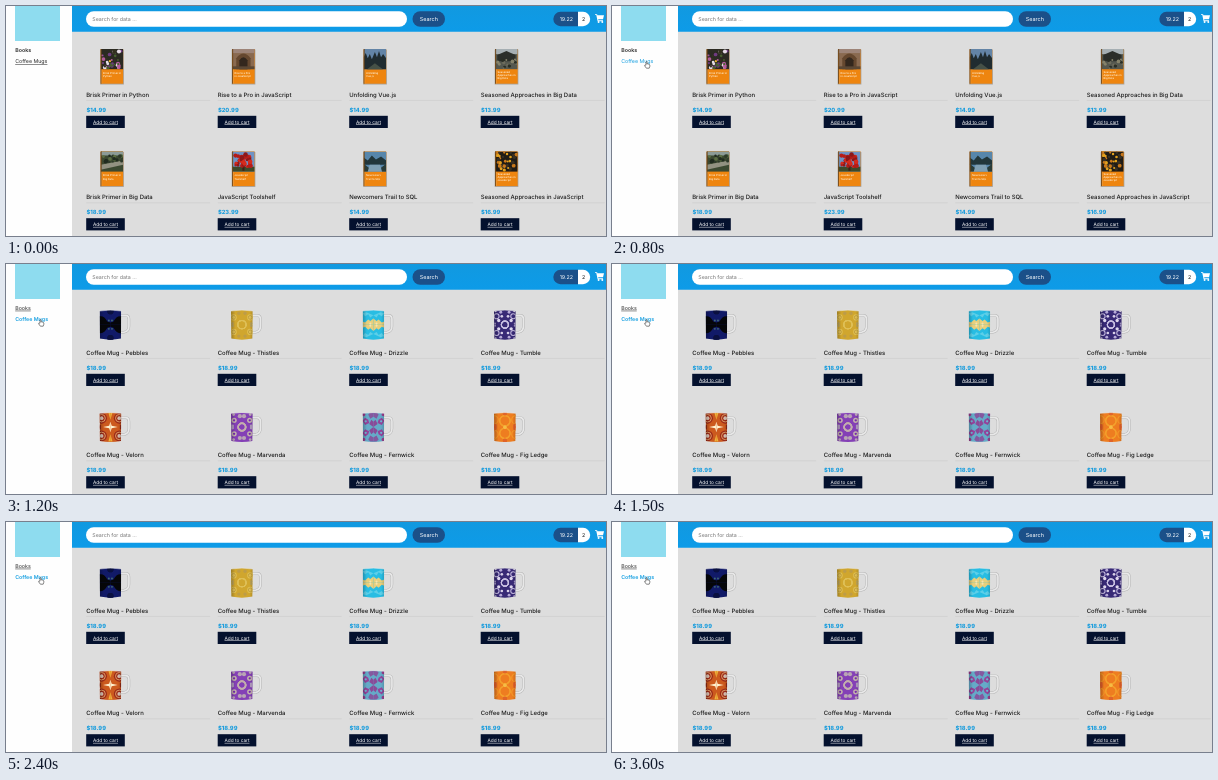
Recreate the animation shown at these times as an HTML page. Size 600 px wide and 230 px high, loop 3.7 s.

```html
<!DOCTYPE html>
<html lang="en">
<head>
<meta charset="utf-8">
<title>Shop catalogue</title>
<style>
  html, body { margin: 0; width: 100%; height: 100%; overflow: hidden; background: #fefefe; }
  svg { display: block; width: 600px; height: 230px; }
  text { font-family: Inter, "Open Sans", sans-serif; font-size: 5.3px; text-rendering: geometricPrecision; white-space: pre; }
  .title { font-size: 5.95px; font-weight: 500; fill: #1a1a1a; }
  .price { font-size: 5.75px; font-weight: 800; fill: #1a9ddd; }
  .add { font-size: 4.75px; fill: #fff; text-decoration: underline; text-decoration-thickness: .4px; }
  .cover { font-size: 2.55px; font-weight: 500; fill: #fff3df; }
</style>
</head>
<body>
<svg id="stage" viewBox="0 0 600 230">
  <defs>
    <linearGradient id="bar" x2="0" y2="1">
      <stop stop-color="#1199e0"/><stop offset="1" stop-color="#0d9be8"/>
    </linearGradient>
    <linearGradient id="shade">
      <stop stop-color="#000" stop-opacity=".25"/><stop offset=".2" stop-color="#000" stop-opacity="0"/>
      <stop offset=".85" stop-color="#000" stop-opacity="0"/><stop offset="1" stop-color="#000" stop-opacity=".15"/>
    </linearGradient>
    <clipPath id="photoClip"><path d="M0 0H22V20H0Z"/></clipPath>
    <clipPath id="mugClip"><path d="M0 .8Q10.5 -.8 21 .8L20.6 27.4Q10.5 29.4 .4 27.4Z"/></clipPath>
  </defs>

  <path fill="#fefefe" d="M0 0H66V230H0Z"/>
  <path fill="#ddd" d="M66 25H600V230H66Z"/>
  <path fill="url(#bar)" d="M66 0H600V25.7H66Z"/>
  <path fill="#8edcef" d="M9 0H54V35H9Z"/>

  <rect x="80" y="5.3" width="321" height="15.4" rx="7.7" fill="#fff"/>
  <text x="86.3" y="15" fill="#777">Search for data ...</text>
  <rect x="406.5" y="5.3" width="32.5" height="15.4" rx="7.7" fill="#1b5089"/>
  <text x="422.8" y="15" fill="#fff" text-anchor="middle" style="font-size:5.5px">Search</text>

  <path fill="#1b5089" d="M572 5.8H554.5a7.2 7.2 0 0 0 0 14.4H572Z"/>
  <path fill="#fff" d="M572 5.8H577a7.2 7.2 0 0 1 0 14.4H572Z"/>
  <text x="560.3" y="15" fill="#fff" text-anchor="middle">19.22</text>
  <text x="577.6" y="15" fill="#111" text-anchor="middle">2</text>
  <g fill="#fff">
    <path d="M589 8.2H591.1L591.4 9.3H598L597 13.3H592.2L592.4 14.3H597V15.2H591.6L590.3 9.1H589Z"/>
    <circle cx="592.6" cy="16" r=".95"/><circle cx="596.3" cy="16" r=".95"/>
  </g>

  <text id="booksLink" x="9.2" y="45.7">Books</text>
  <text id="mugsLink" x="9.2" y="57.4">Coffee Mugs</text>

  <g id="books"></g>
  <g id="bareMugs"></g>
  <g id="mugs"></g>

  <path id="cursor" fill="#fff" stroke="#222" stroke-width=".55" stroke-linejoin="round"
    d="M34 59.2V55.9Q34.5 55.1 35 55.9V58Q35.6 57.6 36 58.2Q36.7 57.9 37 58.5Q37.7 58.4 37.8 59.1V60.4L37.2 62.2H34.4L32.7 59.9Q32.5 59 33.2 59Z"/>
</svg>
<script>
const LOOP = 3700, HOVER = 500, OPEN = 900, LOADED = 1200;
const $ = id => document.getElementById(id);

const rect = (x, y, w, h, fill) => `<rect x="${x}" y="${y}" width="${w}" height="${h}" fill="${fill}"/>`;
const dot = (x, y, r, fill) => `<circle cx="${x}" cy="${y}" r="${r}" fill="${fill}"/>`;
const path = (d, fill) => `<path d="${d}" fill="${fill}"/>`;
const ring = (x, y, r, stroke, width) =>
  `<circle cx="${x}" cy="${y}" r="${r}" fill="none" stroke="${stroke}" stroke-width="${width}"/>`;

function randomFrom(seed) {
  return () => (seed = (seed * 16807) % 2147483647) / 2147483647;
}

function scatter(seed, count, colors, [x, y, w, h], size) {
  const rnd = randomFrom(seed * 7919);
  return Array.from({ length: count }, (_, i) =>
    dot((x + rnd() * w).toFixed(1), (y + rnd() * h).toFixed(1), (size * (.5 + rnd() * .7)).toFixed(1), colors[i % colors.length])
  ).join('');
}

const books = [
  { title: 'Brisk Primer in Python', price: '14.99', lines: ['Brisk Primer in', 'Python'],
    photo: rect(0, 0, 22, 20, '#2b2a22') + scatter(3, 34, ['#b45c9c', '#e6dce6', '#47602e', '#6f3b80', '#33301f'], [1, 1, 20, 18], 1.7) +
      dot(9, 12, 1.1, '#e6b62c') },
  { title: 'Rise to a Pro in JavaScript', price: '20.99', lines: ['Rise to a Pro', 'in JavaScript'],
    photo: rect(0, 0, 22, 20, '#8a6a50') + rect(0, 0, 22, 4, '#9d8478') + path('M4 20V9Q11 0 18 9V20Z', '#66482f') +
      path('M7 20V11Q11 5 15 11V20Z', '#33271d') + rect(0, 17, 22, 3, '#5b4835') },
  { title: 'Unfolding Vue.js', price: '14.99', lines: ['Unfolding', 'Vue.js'],
    photo: rect(0, 0, 22, 20, '#6384a6') + path('M0 20V8L2 4L4 9L6 5L8 10L11 3L13 8L15 2L17 8L19 5L22 9V20Z', '#202c30') +
      path('M3 20L11 14L19 20Z', '#465147') },
  { title: 'Seasoned Approaches in Big Data', price: '13.99', lines: ['Seasoned', 'Approaches in', 'Big Data'],
    photo: rect(0, 0, 22, 20, '#55584f') + rect(0, 0, 22, 5, '#a6afb3') + path('M2 12V6L11 2L20 6V12Z', '#2b2e2a') +
      scatter(8, 16, ['#85826a', '#292e25', '#6d6c5c'], [1, 9, 20, 10], 1.5) },
  { title: 'Brisk Primer in Big Data', price: '18.99', lines: ['Brisk Primer in', 'Big Data'],
    photo: rect(0, 0, 22, 20, '#3c4931') + rect(0, 0, 22, 4, '#8c9b97') + path('M0 13L22 9V13L0 18Z', '#929181') +
      scatter(12, 18, ['#202b1f', '#5b6d42', '#2d3929'], [1, 3, 20, 7], 1.7) },
  { title: 'JavaScript Toolshelf', price: '23.99', lines: ['JavaScript', 'Toolshelf'],
    photo: rect(0, 0, 22, 20, '#6f93c4') + rect(0, 15, 22, 5, '#3d4a2a') + rect(10, 10, 2, 9, '#402017') +
      scatter(9, 40, ['#b51c18', '#d62b1d', '#8d1718'], [3, 3, 16, 12], 2.1) },
  { title: 'Newcomers Trail to SQL', price: '14.99', lines: ['Newcomers', 'Trail to SQL'],
    photo: rect(0, 0, 22, 20, '#5786ab') + path('M0 13V6L4 9L8 4L12 8L17 5L22 9V13Z', '#22363a') +
      path('M6 13H16L18 20H3Z', '#7f9fb2') + path('M0 20V12L5 16L4 20ZM22 20V12L17 16L18 20Z', '#2a3c38') },
  { title: 'Seasoned Approaches in JavaScript', price: '16.99', lines: ['Seasoned', 'Approaches in', 'JavaScript'],
    photo: rect(0, 0, 22, 20, '#201c16') + scatter(17, 38, ['#e3a21e', '#c8781b', '#393022'], [1, 1, 20, 18], 1.6) }
];

// Each motif is one quadrant around the mug's centre, mirrored on both axes.
const mugs = [
  { name: 'Pebbles', base: '#111a68', motif: path('M0 0V2L3 3Q6 9 10.5 8V0Z', '#050609') +
      path('M0 2.4L3 3.4Q6 9.4 10.5 8.4', 'none') + dot(1.5, 4, .9, '#3f6a74') + dot(0, 13, 3, '#0a1040') },
  { name: 'Thistles', base: '#d0a62e', motif: ring(0, 0, 4, '#dfc058', 1) + dot(8, 7, 3, '#dfbf52') +
      ring(8, 7, 1.8, '#b8963a', .7) + dot(3, 11, 1.6, '#bd9c48') + dot(9, 1, 1.2, '#b9a25c') },
  { name: 'Drizzle', base: '#28bde3', motif: path('M0 0V6L3 3.5L5 5L8 2L10.5 3V0Z', '#e8cf7c') +
      path('M0 9L3 7L5 10L8 8L10.5 11L7 12Z', '#5dcfe8') + dot(3, 1, 1, '#f3e4b0') },
  { name: 'Tumble', base: '#382a76', motif: ring(0, 0, 3.4, '#c9c0e2', 1.1) + dot(6, 4, 1.6, '#ddd6ec') + ring(8, 8, 2.4, '#c6bce0', 1) +
      dot(3, 8, 1.3, '#d8d0e8') + dot(4, 12, 1.4, '#b5a9d6') + dot(9.5, 1, 1, '#a99ccc') + dot(9, 13, 1, '#d8d0e8') },
  { name: 'Velorn', base: '#cc5a1e', motif: dot(8.5, 8.5, 5.2, '#9c2a18') + ring(8.5, 8.5, 3.6, '#e0a468', .9) + dot(8.5, 8.5, 1.8, '#d8c0b0') +
      path('M0 0L0 5L1.2 1.2L7 0Z', '#fff1ce') + path('M0 14V7L2 14Z', '#edb33c') + dot(10.5, 1, 1.5, '#8e2615') },
  { name: 'Marvenda', base: '#8440b6', motif: ring(0, 0, 3.6, '#c3afac', 1.4) + dot(7.5, 6.5, 2.5, '#c3b2ac') +
      dot(7.5, 6.5, 1.1, '#7627b0') + dot(2, 10.5, 2, '#b9a5b4') + dot(9, 1, 1.4, '#b5a1c1') + dot(8, 12, 1.3, '#bda9b6') },
  { name: 'Fernwick', base: '#65aac8', motif: path('M0 0L4 3L2 7L0 5Z', '#8a4a98') + path('M4 4L8 2L10.5 6L8 9L5 7Z', '#95429a') +
      dot(7.5, 5.5, 1.1, '#6bbcd6') + path('M0 10L3 8L5 12L3 14H0Z', '#84589f') + dot(9.5, 12, 1.7, '#9c3c8c') },
  { name: 'Fig Ledge', base: '#ee7d20', motif: ring(0, 6, 5, '#f3a12c', 1.1) + ring(10.5, 7, 4, '#f39a28', 1) +
      dot(10, 1, 2.2, '#e2602a') + dot(0, 13, 2, '#e0642a') + dot(0, 0, 1.5, '#f5bc46') },
  { name: 'Quibble' }, { name: 'Nub' }, { name: 'Gleam' }, { name: 'Rolling' }
];

function drawBook({ photo, lines }) {
  const top = lines.length > 2 ? 23.2 : 24.6;
  const label = lines.map((line, i) => `<text class="cover" x="2.3" y="${top + i * 3.1}">${line}</text>`).join('');
  return `<g transform="translate(94.7 43) scale(1.02)">
    ${rect(-.5, .6, 23.2, 34.2, '#a6a099')}${rect(0, 0, 22, 34, '#ee850f')}
    <g clip-path="url(#photoClip)">${photo}</g>
    ${rect(0, 0, .9, 34, '#6b4418')}${rect(.9, 20, .5, 14, '#f7aa4b')}${label}</g>`;
}

function drawMug({ base, motif }) {
  const quarters = ['1 1', '-1 1', '1 -1', '-1 -1'].map(s => `<g transform="scale(${s})">${motif}</g>`).join('');
  const handle = 'M20 5H25Q28.3 5 28.3 8.6V15.5Q28.3 20.5 23.5 21.3H20';
  return `<g transform="translate(93.5 46.1) scale(1.04)">
    <path d="${handle}" fill="none" stroke="#b3b3b3" stroke-width="2.5"/>
    <path d="${handle}" fill="none" stroke="#e8e8e8" stroke-width="1.6"/>
    <g clip-path="url(#mugClip)">${rect(0, -1, 21, 31, base)}
      <g transform="translate(10.5 14)">${quarters}</g>${rect(0, -1, 21, 31, 'url(#shade)')}</g>
    <path d="M0 .8Q10.5 -.8 21 .8" fill="none" stroke="#e9e9e9" stroke-width=".6"/></g>`;
}

function drawShelf(items, rowStep, lift, drawItem) {
  return items.map((item, i) => {
    const x = (i % 4) * 131.5, y = Math.floor(i / 4) * rowStep;
    return `<g transform="translate(${x} ${y})">${drawItem ? drawItem(item) : ''}
      <g transform="translate(80.2 ${-lift})">
        <text class="title" y="91.1">${item.title || 'Coffee Mug - ' + item.name}</text>
        <path d="M0 94.4H124" stroke="#c6c6c6" stroke-width=".5"/>
        <text class="price" x=".2" y="105.9">$${item.price || '18.99'}</text>
        ${rect(0, 109.8, 38.6, 12.2, '#04112e')}
        <text class="add" x="19.3" y="117.5" text-anchor="middle">Add to cart</text>
      </g></g>`;
  }).join('');
}

$('books').innerHTML = drawShelf(books, 102.4, 0, drawBook);
$('bareMugs').innerHTML = drawShelf(mugs, 69.5, 33);
$('mugs').innerHTML = drawShelf(mugs.slice(0, 8), 102.4, 0, drawMug);

const show = (id, on) => { $(id).style.display = on ? '' : 'none'; };

function styleLink(id, selected, hovered) {
  Object.assign($(id).style, {
    fontWeight: selected ? 600 : 400,
    fill: hovered ? '#159fe1' : '#2a2a2a',
    textDecoration: selected || hovered ? 'none' : 'underline .4px'
  });
}

function render(t) {
  const hovered = t >= HOVER, opened = t >= OPEN, loaded = t >= LOADED;
  show('books', !opened);
  show('bareMugs', opened && !loaded);
  show('mugs', loaded);
  show('cursor', hovered);
  styleLink('booksLink', !opened, false);
  styleLink('mugsLink', opened, hovered);
}

const start = performance.now();
function tick() {
  render((performance.now() - start) % LOOP);
  requestAnimationFrame(tick);
}
tick();
</script>
</body>
</html>
```
